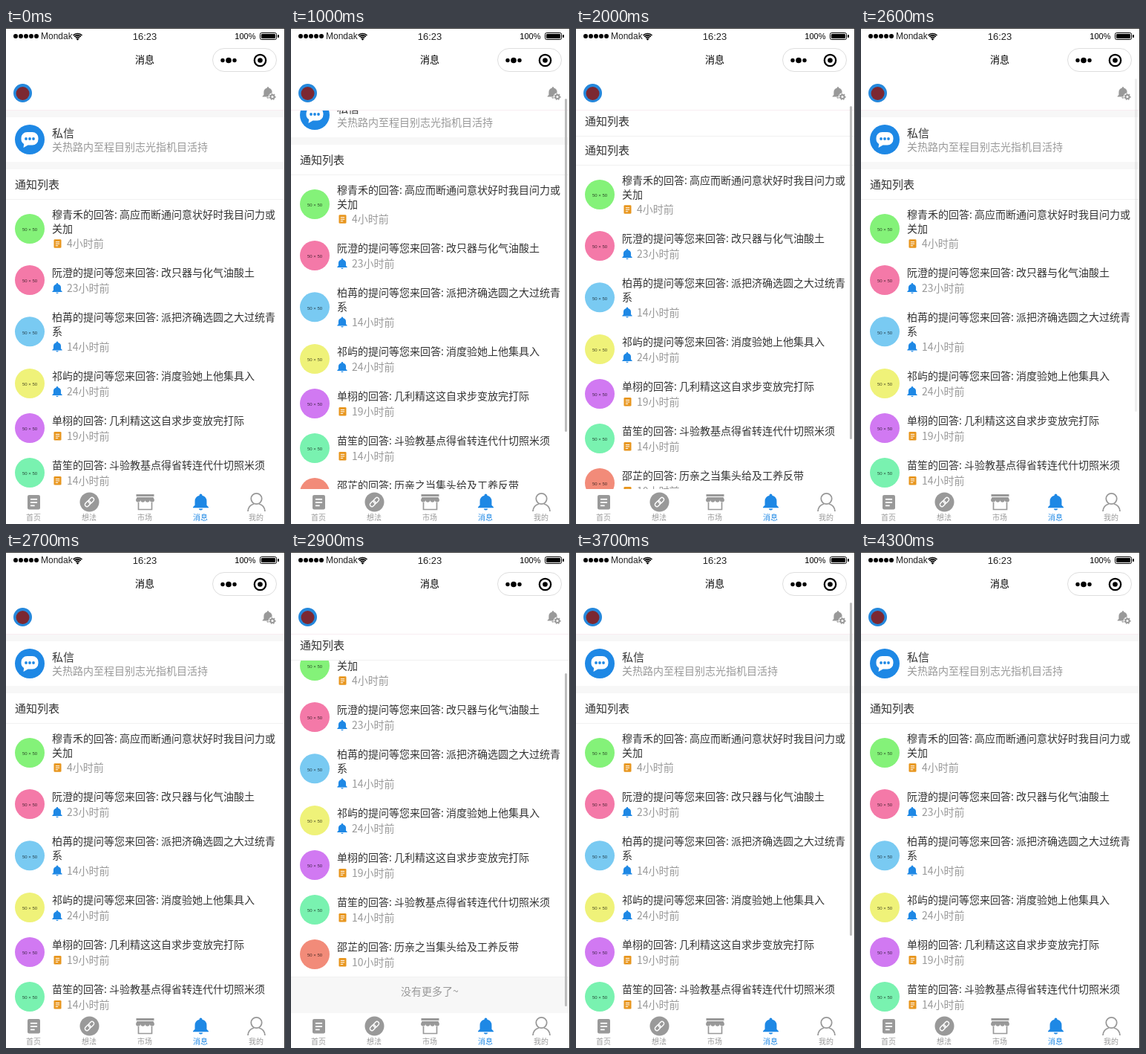
Animation, 376 px wide and 667 px high, one loop 4700 ms. Source, as an HTML page with a canvas:

```html
<!DOCTYPE html>
<html lang="zh-CN">
<head>
<meta charset="utf-8">
<title>消息</title>
<style>
html, body { margin: 0; width: 100%; height: 100%; overflow: hidden; background: #fff; }
canvas { display: block; width: 376px; height: 667px; }
</style>
</head>
<body>
<canvas id="stage"></canvas>
<script>
const W = 376, H = 667, LOOP = 4700;
const BLUE = '#1e88e5', GRAY = '#999', INK = '#333', BAND = '#f7f7f7', RULE = '#f1f1f1';
const CJK = '"Noto Sans CJK SC", "Noto Sans CJK", sans-serif';
const LATIN = '"Liberation Sans", sans-serif';
const HEADER_BOTTOM = 110, TAB_TOP = 620, MAX_SCROLL = 117;

const canvas = document.getElementById('stage');
const ctx = canvas.getContext('2d');
const dpr = window.devicePixelRatio || 1;
canvas.width = W * dpr;
canvas.height = H * dpr;

// start time, scroll offset, scrollbar opacity, pinned list heading
const fadeOut = (start, scroll, pinned) =>
  [0.65, 0.25, 0].map((alpha, i) => [start + i * 100, scroll, alpha, pinned]);
const steps = [
  [0, 0, 0, false],
  [1000, 33, 1, false],
  [1100, 95, 1, true],
  [1200, MAX_SCROLL, 1, true],
  ...fadeOut(1500, MAX_SCROLL, true),
  [2000, 46, 1, true],
  [2100, 0, 1, false],
  ...fadeOut(2500, 0, false),
  [2800, 47, 1, false],
  [2900, MAX_SCROLL, 1, true],
  ...fadeOut(3200, MAX_SCROLL, true),
  [3600, 44, 1, true],
  [3700, 0, 1, false],
  ...fadeOut(4100, 0, false)
];

const items = [
  { y: 270, color: '#84f279', lines: ['穆青禾的回答: 高应而断通问意状好时我目问力或', '关加'], hours: 4 },
  { y: 339, color: '#f479a8', lines: ['阮澄的提问等您来回答: 改只器与化气油酸土'], hours: 23, ask: true },
  { y: 408.3, color: '#79caf2', lines: ['柏苒的提问等您来回答: 派把济确选圆之大过统青', '系'], hours: 14, ask: true },
  { y: 478, color: '#eff279', lines: ['祁屿的提问等您来回答: 消度验她上他集具入'], hours: 24, ask: true },
  { y: 538, color: '#d179f2', lines: ['单栩的回答: 几利精这这自求步变放完打际'], hours: 19 },
  { y: 598, color: '#79f2b0', lines: ['苗笙的回答: 斗验教基点得省转连代什切照米须'], hours: 14 },
  { y: 658, color: '#f28b79', lines: ['邵芷的回答: 历亲之当集头给及工养反带'], hours: 10 }
];

const bellPath = new Path2D('M12 2a1.9 1.9 0 0 1 1.9 1.9v.3A7.6 7.6 0 0 1 19.6 11.5v5l2.4 2.4v1H2v-1l2.4-2.4v-5A7.6 7.6 0 0 1 10.1 4.2v-.3A1.9 1.9 0 0 1 12 2zM9.500 21h5a2.500 2 0 0 1-5 0z');
const bubblePath = new Path2D('M28.500 140h7a8 8 0 0 1 8 8v1.500a8 8 0 0 1-8 8h-6l-6 3.500l.7-4.900a8 8 0 0 1-3.700-6.600v-1.500a8 8 0 0 1 8-8z');
const shopBodyPath = new Path2D('M178.500 638v9.500h18v-9.500');
const awningPath = new Path2D('M176.500 631l-1.500 3.500a3.100 3.100 0 0 0 6.200 0a3.100 3.100 0 0 0 6.300 0a3.100 3.100 0 0 0 6.300 0a3.100 3.100 0 0 0 6.200 0l-1.500-3.500z');
const shouldersPath = new Path2D('M326 650c.4-5.500 3.300-8.800 8-10M349 650c-.4-5.500-3.300-8.800-8-10');

function rect(x, y, w, h, color, radius = 0) {
  ctx.fillStyle = color;
  ctx.beginPath();
  ctx.roundRect(x, y, w, h, radius);
  ctx.fill();
}

function disc(x, y, r, color) {
  ctx.fillStyle = color;
  ctx.beginPath();
  ctx.arc(x, y, r, 0, Math.PI * 2);
  ctx.fill();
}

function ring(x, y, r, color, width) {
  ctx.strokeStyle = color;
  ctx.lineWidth = width;
  ctx.beginPath();
  ctx.arc(x, y, r, 0, Math.PI * 2);
  ctx.stroke();
}

// y is the visual middle of the glyphs
function text(value, x, y, size, color, align = 'left', family = CJK) {
  ctx.font = `${size}px ${family}`;
  ctx.textAlign = align;
  ctx.fillStyle = color;
  ctx.fillText(value, x, Math.round(y + size * 0.37));
}

function bell(x, y, size, color) {
  ctx.save();
  ctx.translate(x, y);
  ctx.scale(size / 21, size / 21);
  ctx.translate(-12, -12.5);
  ctx.fillStyle = color;
  ctx.fill(bellPath);
  ctx.restore();
}

function note(x, y, w, h, color) {
  rect(x, y, w, h, color, w * 0.13);
  [[0.25, 0.54], [0.47, 0.54], [0.69, 0.34]].forEach(([top, width]) =>
    rect(x + w * 0.23, y + h * top, w * width, h * 0.09, '#fff'));
}

function drawItem({ y, color, lines, hours, ask }) {
  disc(32, y, 20, color);
  text('50 × 50', 32, y + 1, 6, 'rgba(0,0,0,.7)', 'center', LATIN);
  const top = lines.length > 1 ? y - 19 : y - 10;
  lines.forEach((line, i) => text(line, 62, top + i * 19, 14, INK));
  const metaY = lines.length > 1 ? y + 20.3 : y + 11;
  if (ask) bell(69, metaY, 14, BLUE);
  else note(64.5, metaY - 6, 10, 11.5, '#e8961e');
  text(`${hours}小时前`, 82, metaY, 14, GRAY);
}

function drawContent(scroll) {
  ctx.save();
  ctx.beginPath();
  ctx.rect(0, HEADER_BOTTOM, W, TAB_TOP - HEADER_BOTTOM);
  ctx.clip();
  ctx.translate(0, -scroll);

  rect(0, 110, W, 10, BAND);
  disc(32, 150, 20, BLUE);
  ctx.fillStyle = '#fff';
  ctx.fill(bubblePath);
  [27, 32, 37].forEach(x => disc(x, 149, 1.9, BLUE));
  text('私信', 62, 141, 15, INK);
  text('关热路内至程目别志光指机目活持', 62, 160, 14, GRAY);

  rect(0, 180, W, 10, BAND);
  text('通知列表', 12, 210, 15, INK);
  rect(0, 230, W, 1, RULE);
  items.forEach(drawItem);

  rect(0, 688, W, 60, BAND);
  rect(0, 688, W, 1, RULE);
  text('没有更多了~', 187, 708, 14, GRAY, 'center');
  ctx.restore();
}

function drawPinnedHeading() {
  rect(0, HEADER_BOTTOM, W, 36, '#fff');
  text('通知列表', 12, 125, 15, INK);
  rect(0, 145, W, 1, RULE);
}

function drawStatusBar() {
  for (let i = 0; i < 5; i++) disc(13 + i * 7, 11, 3, '#000');
  text('Mondak', 47, 11, 12, '#222', 'left', LATIN);
  disc(96.5, 15, 1.4, '#000');
  ctx.strokeStyle = '#000';
  ctx.lineWidth = 1.7;
  [3.6, 6.2, 8.5].forEach(r => {
    ctx.beginPath();
    ctx.arc(96.5, 16, r, -Math.PI * 0.75, -Math.PI * 0.25);
    ctx.stroke();
  });
  text('16:23', 187, 11, 13, '#222', 'center', LATIN);
  text('100%', 336.5, 11, 11, '#000', 'right', LATIN);
  ctx.lineWidth = 1;
  ctx.beginPath();
  ctx.roundRect(342.5, 6.5, 22, 9, 2);
  ctx.stroke();
  rect(344, 8, 19, 6, '#000', 1);
  rect(366, 9, 2, 4, '#000', 1);
}

function drawHeader() {
  rect(0, 0, W, HEADER_BOTTOM, '#fff');
  drawStatusBar();
  text('消息', 187, 42, 13, '#000', 'center');

  ctx.strokeStyle = '#dedede';
  ctx.lineWidth = 1;
  ctx.beginPath();
  ctx.roundRect(278.5, 27.5, 86, 31, 15.5);
  ctx.stroke();
  disc(292, 43.5, 2.7, '#000');
  disc(300, 43.5, 3.8, '#000');
  disc(308, 43.5, 2.7, '#000');
  ring(342.5, 43.5, 7.7, '#000', 2.3);
  disc(342.5, 43.5, 3.3, '#000');

  disc(22.5, 87.5, 12.5, '#2588dc');
  disc(22.5, 88, 9, '#7c2832');

  bell(353, 87, 15.5, GRAY);
  disc(359, 92.5, 5.3, '#fff');
  ring(359, 92.5, 2.6, GRAY, 2);
  ctx.setLineDash([1.6, 1.7]);
  ring(359, 92.5, 3.9, GRAY, 1.3);
  ctx.setLineDash([]);

  rect(0, HEADER_BOTTOM, W, 1, '#f9edf2');
}

function drawLinkIcon(x, y) {
  disc(x, y, 13, GRAY);
  ctx.save();
  ctx.translate(x, y);
  ctx.rotate(-Math.PI / 4);
  ctx.strokeStyle = '#fff';
  ctx.lineWidth = 1.4;
  [-7.5, -1].forEach(left => {
    ctx.beginPath();
    ctx.roundRect(left, -2.7, 8.5, 5.4, 2.7);
    ctx.stroke();
  });
  ctx.restore();
}

function drawShopIcon() {
  rect(175.5, 627, 24, 3, GRAY);
  ctx.fillStyle = ctx.strokeStyle = GRAY;
  ctx.lineWidth = 1.7;
  ctx.fill(awningPath);
  ctx.stroke(shopBodyPath);
}

function drawTabs() {
  rect(0, TAB_TOP, W, H - TAB_TOP, '#fff');
  note(29, 628, 17, 19.5, GRAY);
  drawLinkIcon(112.5, 637.5);
  drawShopIcon();
  bell(262.5, 637.5, 22, BLUE);
  ring(337.5, 633, 7.2, GRAY, 1.8);
  ctx.stroke(shouldersPath);
  ['首页', '想法', '市场', '消息', '我的'].forEach((label, i) =>
    text(label, 37 + i * 75, 658, 10, i === 3 ? BLUE : GRAY, 'center'));
}

function drawScrollbar(scroll, alpha) {
  ctx.globalAlpha = alpha;
  rect(369, Math.round(68 + scroll * 95 / MAX_SCROLL), 3, 448, '#bcbcbc', 1.5);
  ctx.globalAlpha = 1;
}

function render(time) {
  const [, scroll, barAlpha, pinned] = steps.findLast(step => step[0] <= time);
  ctx.setTransform(dpr, 0, 0, dpr, 0, 0);
  rect(0, 0, W, H, '#fff');
  drawContent(scroll);
  if (pinned) drawPinnedHeading();
  drawHeader();
  drawTabs();
  drawScrollbar(scroll, barAlpha);
  rect(0, 0, W, 1, '#333');
  rect(375, 0, 1, H, '#333');
}

const start = performance.now();
function tick() {
  render((performance.now() - start) % LOOP);
  requestAnimationFrame(tick);
}
tick();
</script>
</body>
</html>
```
